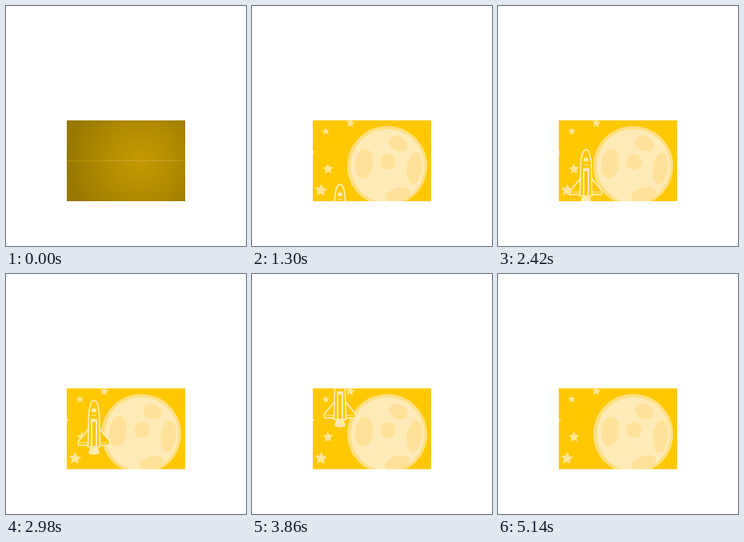
Recreate the animation shown at these times as an HTML page. Size 300 by 300 pixels, loop 5380 ms.

```html
<!DOCTYPE html>
<html lang="en">
<head>
<meta charset="utf-8">
<title>Rocket and moon</title>
<style>
html, body { margin: 0; width: 100%; height: 100%; overflow: hidden; background: #fff; }
svg { display: block; width: 100vw; height: 100vh; }
</style>
</head>
<body>
<svg viewBox="0 0 300 300">
  <defs>
    <clipPath id="card"><rect x="76" y="143" width="148" height="101"/></clipPath>
    <radialGradient id="shade" gradientUnits="userSpaceOnUse" cx="168" cy="193" r="92">
      <stop offset="0" stop-color="#c49a00"/>
      <stop offset=".5" stop-color="#b08b00"/>
      <stop offset="1" stop-color="#987800"/>
    </radialGradient>
  </defs>
  <g clip-path="url(#card)">
    <path fill="#ffc800" d="M76 143h148v101H76z"/>
    <g id="stars" fill="#ffe596"></g>
    <circle cx="169" cy="200" r="50" fill="#ffdf80"/>
    <circle cx="169.5" cy="200" r="46" fill="#ffebb8"/>
    <g fill="#ffe199">
      <ellipse cx="140" cy="197" rx="11" ry="19" transform="rotate(7 140 197)"/>
      <circle cx="170" cy="195" r="10"/>
      <ellipse cx="183" cy="172" rx="12" ry="9" transform="rotate(25 183 172)"/>
      <ellipse cx="203" cy="203" rx="9.5" ry="20" transform="rotate(7 203 203)"/>
      <ellipse cx="182" cy="236" rx="16" ry="8.5" transform="rotate(-16 182 236)"/>
    </g>
    <!-- nose at the origin -->
    <g id="rocket" fill="#ffc800" stroke="#ffebb0" stroke-width="1.8" stroke-linejoin="round">
      <path fill="#ffebb0" stroke="none" d="M-5 60H5L7 67Q0 71-7 67Z"/>
      <path d="M-7 37L-19.5 52V57H19.5V52L7 37Z"/>
      <path d="M-17 54H17" stroke-width="1"/>
      <path d="M-7.5 59L-6.5 18Q-5 1 0 1T6.5 18L7.5 59Z"/>
      <path fill="#ffebb0" stroke="none" d="M-3 15V12.5Q0 9 3 12.5V15Q0 17-3 15ZM-4 59V24H4V59H2V28H-2V59Z"/>
      <path d="M-3 20H3" stroke-width="1"/>
    </g>
    <g fill="url(#shade)">
      <rect id="upper" x="76" y="143" width="148"/>
      <rect id="lower" x="76" width="148"/>
    </g>
  </g>
</svg>
<script>
const LOOP = 5380, TOP = 143, HEIGHT = 101;
const get = id => document.getElementById(id);

function star(x, y, r, turn) {
  const points = Array.from({ length: 10 }, (_, i) => {
    const a = (turn - 90 + i * 36) * Math.PI / 180, d = i % 2 ? r * .48 : r;
    return `${x + d * Math.cos(a)},${y + d * Math.sin(a)}`;
  });
  return `<polygon points="${points.join(' ')}"/>`;
}

get('stars').innerHTML = [
  [123, 146.5, 6, 8], [92.3, 156.7, 5, -4], [74, 183, 5.5, 8], [95, 203.8, 7, -4], [86.3, 230.5, 8.3, 5]
].map(s => star(...s)).join('');

// The doors open in 100 ms steps, then the rocket climbs in 80 ms steps.
function draw(now) {
  const t = now % LOOP;
  const step = t < 1300 ? Math.floor((t - 1300) / 100) : Math.floor((t - 1300) / 80);
  const open = Math.max(0, Math.min(1, (step + 4) / 3));
  const door = HEIGHT * (1 - open) / 2;
  get('upper').setAttribute('height', door);
  get('lower').setAttribute('height', door);
  get('lower').setAttribute('y', TOP + HEIGHT - door);
  get('rocket').setAttribute('transform', `translate(110 ${222 - step * 3.1})`);
}

const start = performance.now();
function tick() {
  draw(performance.now() - start);
  requestAnimationFrame(tick);
}
tick();
</script>
</body>
</html>
```
